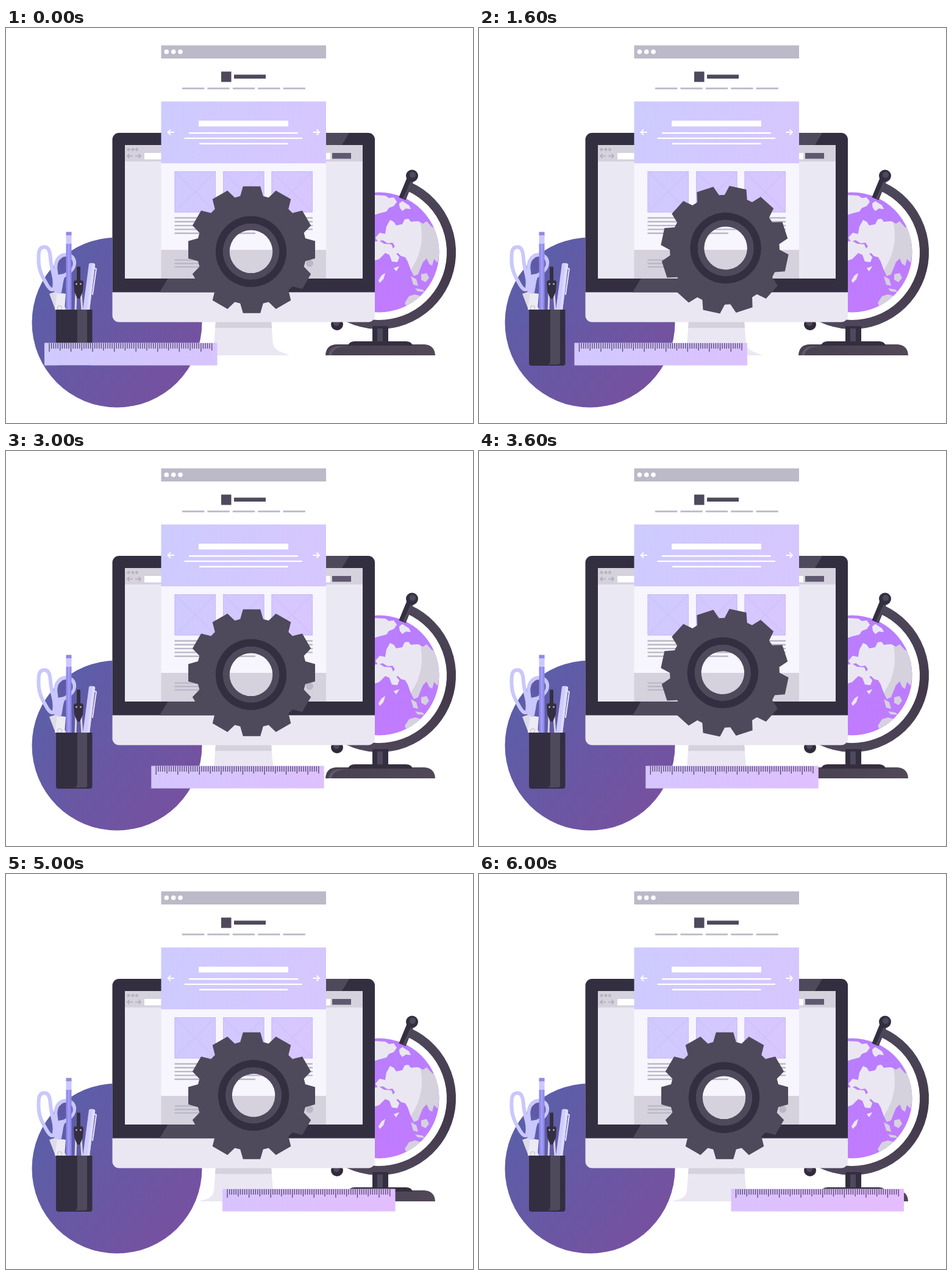
These frames come from a looping animation (766 by 648 pixels, 6.4 s). An HTML page with a canvas:

```html
<!DOCTYPE html>
<html lang="en">
<head>
<meta charset="utf-8">
<title>Design desk</title>
<style>
html, body { margin: 0; width: 100%; height: 100%; overflow: hidden; background: #fff; }
canvas { display: block; }
</style>
</head>
<body>
<canvas id="stage" width="766" height="648"></canvas>
<script>
const W = 766, H = 648, TAU = Math.PI * 2;
const LOOP = 6400, STEP = 200, LAST = 30;
const DARK = '#332f41', SLATE = '#4f495c', PALE = '#eae7f2', GREY = '#d5d2de', LINE = '#bab7c6';

const view = document.getElementById('stage').getContext('2d');
const scene = document.createElement('canvas');
scene.width = W;
scene.height = H;
let g = scene.getContext('2d');

function grad(x0, y0, x1, y1, ...colors) {
  const fill = g.createLinearGradient(x0, y0, x1, y1);
  colors.forEach((c, i) => fill.addColorStop(i / (colors.length - 1), c));
  return fill;
}
function box(x0, y0, x1, y1, fill, r = 0) {
  g.fillStyle = fill;
  g.beginPath();
  g.roundRect(x0, y0, x1 - x0, y1 - y0, r);
  g.fill();
}
function dot(x, y, r, fill) {
  g.fillStyle = fill;
  g.beginPath();
  g.arc(x, y, r, 0, TAU);
  g.fill();
}
function shape(d, fill) {
  g.fillStyle = fill;
  g.fill(new Path2D(d));
}
function stroke(d, color, width, cap = 'butt') {
  g.strokeStyle = color;
  g.lineWidth = width;
  g.lineCap = cap;
  g.lineJoin = 'round';
  g.stroke(new Path2D(d));
}

function drawGlobe() {
  dot(612, 368, 98.5, grad(640, 270, 620, 467, '#b87eff', '#c17bff'));
  const land = new Path2D(
    'M600 274L622 275L628 279L636 278L641 285L636 292L628 295L624 301L612 304L600 308Z' +
    'M645 288L650 284L661 291L664 297L656 296L650 300L646 295Z' +
    'M606 344L613 336L622 338L624 326L630 315L636 318L640 324L650 322L654 314L660 313L664 318L676 317L684 321L690 317L698 326L704 329L708 342L711 368L708 385L702 379L699 390L694 387L690 378L684 384L679 396L676 404L669 407L664 397L659 383L655 376L648 374L643 369L636 372L632 366L638 358L634 352L626 353L618 348L610 350Z' +
    'M600 352L612 349L620 354L632 355L637 367L645 376L642 384L633 383L629 372L622 369L612 379L600 383Z' +
    'M616 406L622 402L619 412L613 418L611 414Z' +
    'M636 394L645 391L640 399Z' +
    'M664 407L673 412L676 423L668 421Z' +
    'M681 404L690 402L694 410L688 417L681 413Z' +
    'M671 427L683 429L687 433L675 432Z' +
    'M654 451L661 440L671 437L681 440L674 449L664 454L657 457Z');
  g.save();
  g.beginPath();
  g.arc(612, 368, 98.5, 0, TAU);
  g.clip();
  g.fillStyle = GREY;
  g.fill(land);
  g.beginPath();
  g.arc(584, 340, 98, 0, TAU);
  g.clip();
  g.fillStyle = PALE;
  g.fill(land);
  g.restore();

  stroke('M650 280L664 246', DARK, 12);
  stroke('M653 280L668 247', SLATE, 4);
  g.strokeStyle = grad(660, 250, 610, 495, '#4e485b', '#42384a', '#4f475a');
  g.lineWidth = 15;
  g.lineCap = 'butt';
  g.beginPath();
  g.arc(612, 368, 118.5, -1.14, 2.2);
  g.stroke();
  dot(666, 242.5, 10, DARK);
  dot(667, 241, 5, SLATE);
  dot(543, 486, 10, '#322a39');
  dot(542, 484, 5, SLATE);

  box(601, 489, 627, 518, DARK);
  box(609, 493, 618, 518, SLATE);
  shape('M524 537Q525 519 543 519H686Q703 520 704 537Z', grad(524, 0, 704, 0, '#48414f', '#4d4555', '#514858'));
  shape('M529 537Q531 523 546 522H560Q536 523 534 537Z', '#60586a');
  shape('M561 521Q563 514 572 514H656Q665 514 667 521Z', '#352e3e');
}

function drawMonitor() {
  shape('M344 480H435L438 519Q440 527 450 531L465 537H316L330 533Q340 529 341 519Z', PALE);
  shape('M344 480H435L436 492H343Z', GREY);

  box(174.5, 172, 605, 482.5, PALE, 11);
  g.save();
  g.beginPath();
  g.roundRect(174.5, 172, 430.5, 310, 11);
  g.clip();
  box(174, 172, 606, 433.5, DARK);
  shape('M252 433.5L409 172H563L406 433.5Z', SLATE);
  g.restore();

  box(195, 192, 585, 411, '#eae8f2');
  box(195, 192, 585, 219, GREY);
  [201, 208, 214.5].forEach(x => dot(x, 199.3, 2.5, '#b8b5c3'));
  stroke('M208 210H199M202.5 206.5L199 210L202.5 213.5M212 210H221M217.5 206.5L221 210L217.5 213.5', '#b0adbc', 1.7);
  box(227, 205, 532, 215.5, '#fff');
  box(535, 205, 566, 214.5, '#5e5970');
}

function drawPage() {
  box(254.5, 28.5, 525, 50, '#bcb9c8');
  [263.3, 274.7, 286].forEach(x => dot(x, 39, 3.8, '#fff'));
  box(254.5, 50, 525, 121, '#fff');
  box(353, 71.5, 369.5, 88.5, SLATE);
  box(374, 76.5, 426, 83, SLATE);
  for (let i = 0; i < 5; i++) box(289 + i * 41.4, 97.8, 325.3 + i * 41.4, 100.6, LINE);

  box(254.5, 120.5, 525, 222, grad(255, 121, 525, 222, '#cdcbff', '#d7c6ff'));
  box(316, 152, 463, 161.5, '#fff');
  box(300, 171, 479, 173.4, '#fff');
  box(292.5, 179.7, 486, 182, '#fff');
  box(317, 188.5, 462.5, 191, '#fff');
  stroke('M276 171H265.5M270 166.5L265.5 171L270 175.5M503.5 171H514M509.5 166.5L514 171L509.5 175.5', '#fff', 1.8);

  box(254.5, 222, 525, 364, '#f7f5fe');
  for (let i = 0; i < 3; i++) {
    const x = 276.5 + i * 79.5, end = x + 67.5;
    box(x, 235, end, 302.5, grad(276, 235, 503, 302, '#cfcaff', '#d8c6ff'));
    stroke(`M${x + .5} 235.5H${end - .5}V302H${x + .5}ZL${end - .5} 302M${end - .5} 235.5L${x + .5} 302`, '#c9b9f5', 1);
    for (let j = 0; j < 5; j++) {
      box(x, 310.3 + j * 6.3, j < 4 ? end : x + 53, 312.7 + j * 6.3, LINE);
    }
  }
  box(254.5, 364, 525, 411, GREY);
  for (let j = 0; j < 3; j++) box(276.5, 379.5 + j * 5.6, 318, 381.8 + j * 5.6, LINE);
  dot(498, 386, 6, LINE);
}

function drawTools() {
  const lilac = '#c9c7fc';
  shape('M71 436L83 432L99 462H81Z', '#dddbe6');
  shape('M84 434L98 436L96 462H80Z', '#eceaf3');
  stroke('M61 359.5C70 358 72 366 73 378C74 398 82 408 79 427C75 433 69 425 65 417C55 401 53 390 53.5 375C53.5 366 55 360 61 359.5Z', lilac, 6);
  stroke('M98 372C108 372 113 379 112 387C111 397 102 402 94 407C89 416 91 427 87 433L82 430C80 420 84 411 82 400C79 384 86 372 98 372Z', lilac, 6);
  shape('M84 405L95 403L91 434H79Z', lilac);
  dot(98, 387, 11.5, '#6159a5');
  g.strokeStyle = LINE;
  g.lineWidth = 1;
  g.beginPath();
  g.arc(88, 459, 3.6, 0, TAU);
  g.stroke();

  box(98.5, 334.5, 107.5, 341, '#9187e5');
  box(98.5, 340, 107.5, 354, '#cbc8ff');
  box(98.5, 354, 107.5, 463, '#8f8aea');
  box(101.5, 354, 104.5, 463, '#a39ff6');

  stroke('M115 435L114 463M123 435L125 463', '#d7d4e2', 3);
  box(116, 391.5, 122, 418, DARK, 1);
  shape('M111 418Q111 414 115 414H123Q127 414 127 418L126 432L121 444H117L112 432Z', DARK);
  dot(115.5, 420, 1.4, '#bcb8ca');
  dot(122.5, 420, 1.4, '#bcb8ca');

  shape('M136 387Q137 385 140 385.5L144 386Q147 387 146 390L137 463H126Z', '#cfccff');
  shape('M142 386L144 386Q147 387 146 390L137 463H133Z', '#dedbff');
  stroke('M145 394L148 395L142 437', '#e7e4f6', 2, 'round');

  box(82, 462, 141.5, 554, DARK, [0, 0, 4, 4]);
  shape('M117 462H133V549Q133 552 128 552H113Q117 551 117 546Z', SLATE);
}

function drawGear(angle) {
  const cx = 403, cy = 363.8, n = 12, hubX = -1, hubY = 3;
  const at = (a, r, side) => [Math.sin(a) * r + Math.cos(a) * side, -Math.cos(a) * r + Math.sin(a) * side];
  const ring = (rOut, rIn, color) => {
    g.fillStyle = color;
    g.beginPath();
    g.arc(hubX, hubY, rOut, 0, TAU);
    g.arc(hubX, hubY, rIn, 0, TAU, true);
    g.fill();
  };
  g.save();
  g.translate(cx, cy);
  g.rotate(angle);
  g.beginPath();
  for (let i = 0; i < n; i++) {
    const a = i * TAU / n;
    g.lineTo(...at(a, 88, -18.8));
    g.lineTo(...at(a, 104, -14.2));
    g.lineTo(...at(a, 104, 14.2));
    g.lineTo(...at(a, 88, 18.8));
  }
  g.closePath();
  g.moveTo(hubX + 57, hubY);
  g.arc(hubX, hubY, 57, 0, TAU, true);
  g.fillStyle = SLATE;
  g.fill('evenodd');
  ring(58.2, 45.5, DARK);
  ring(46, 35.3, SLATE);
  g.restore();
}

function drawRuler(x) {
  box(x, 516.5, x + 283.5, 553.5, grad(63, 0, 700, 0, '#cfcaff', '#d9c3ff', '#e5bcff'));
  for (let i = 0; i <= 75; i++) {
    const len = i % 10 === 0 ? 14 : i % 5 === 0 ? 12 : 9;
    const tx = x + 8 + i * 3.555;
    box(tx - .65, 517, tx + .65, 517 + len, '#51476a');
  }
}

dot(182, 483, 139.5, grad(70, 410, 285, 585, '#5c5ea8', '#7651a0'));
drawGlobe();
drawMonitor();
drawPage();
drawTools();
g = view;

function tick(now) {
  const step = Math.min(LAST, Math.floor(now % LOOP / STEP));
  g.fillStyle = '#fff';
  g.fillRect(0, 0, W, H);
  g.drawImage(scene, 0, 0);
  drawGear(step * TAU / 15);
  drawRuler(63 + step * 11.683);
}

const start = performance.now();
function loop() {
  tick(performance.now() - start);
  requestAnimationFrame(loop);
}
loop();
</script>
</body>
</html>
```
